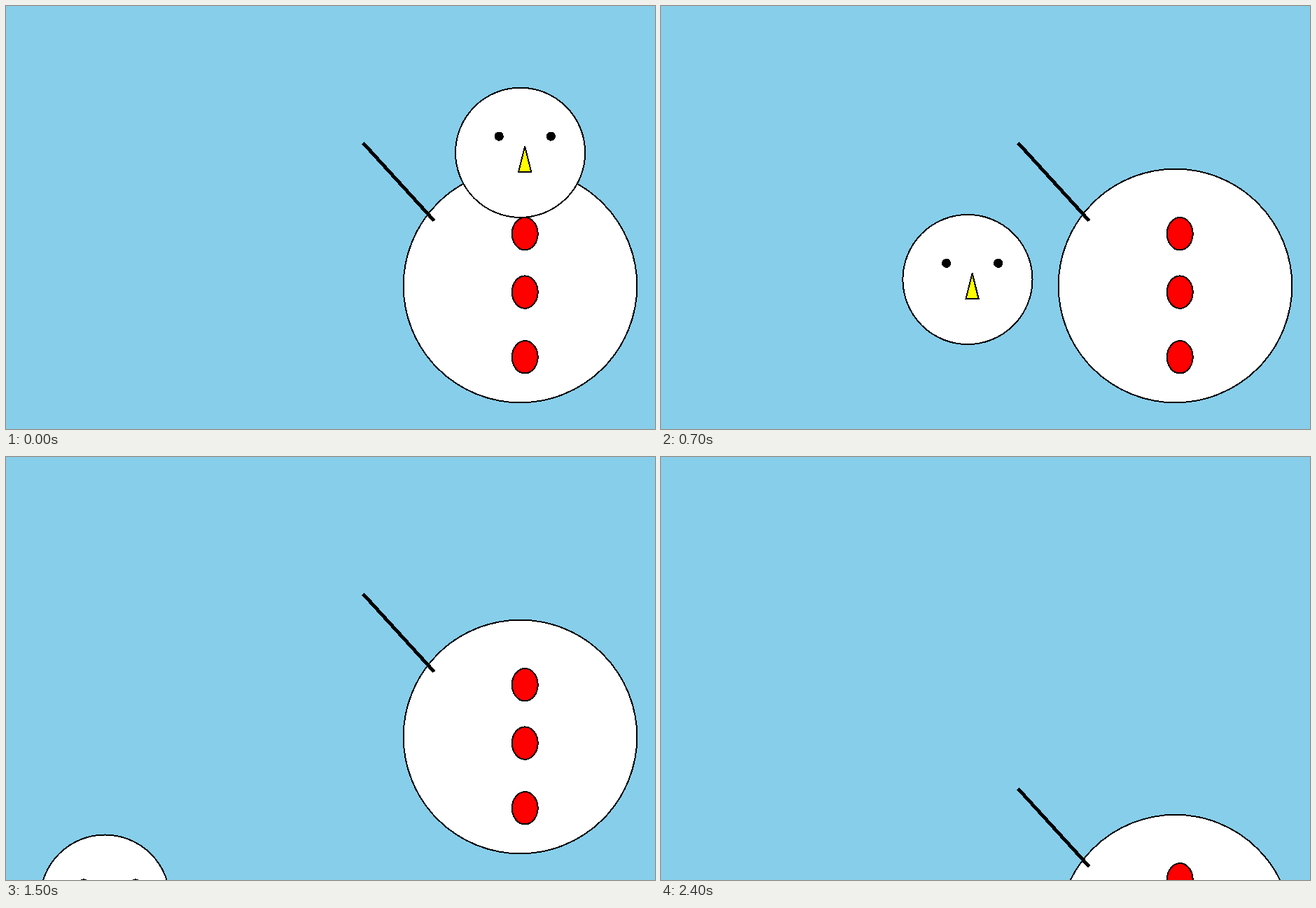
An HTML page that plays this animation: 927 px wide and 604 px high, repeating every 2600 ms.

```html
<!DOCTYPE html>
<html lang="en">
<head>
<meta charset="utf-8">
<title>Melting snowman</title>
<style>
html, body { margin: 0; width: 100%; height: 100%; overflow: hidden; background: #87ceeb; }
svg { display: block; width: 927px; height: 604px; }
</style>
</head>
<body>
<svg viewBox="0 0 927 604" shape-rendering="crispEdges" stroke="#000" stroke-width="2">
  <g id="torso">
    <circle cx="734.5" cy="399.5" r="166.8" fill="#fff"/>
    <path d="M509.9 195.4L611.5 306.6" stroke-width="5"/>
    <g fill="red">
      <ellipse cx="741.2" cy="325.2" rx="18.5" ry="23.2"/>
      <ellipse cx="741.2" cy="408.6" rx="18.5" ry="23.2"/>
      <ellipse cx="741.2" cy="501.3" rx="18.5" ry="23.2"/>
    </g>
  </g>
  <g id="head">
    <circle cx="734.6" cy="209.3" r="92.6" fill="#fff"/>
    <circle cx="704.2" cy="186.1" r="6.6" stroke="none"/>
    <circle cx="778.3" cy="186.1" r="6.6" stroke="none"/>
    <path d="M741.2 200.5L732 237.2H750.4Z" fill="#ff0"/>
  </g>
</svg>
<script>
const LOOP = 2600, TICK = 100;
const HEAD_LEFT = 74.16, HEAD_DOWN = 60.4, TORSO_DOWN = 55.62;
const head = document.getElementById('head');
const torso = document.getElementById('torso');

const clamp = (v, lo, hi) => Math.min(hi, Math.max(lo, v));
const move = (el, x, y) => el.setAttribute('transform', `translate(${x} ${y})`);

function draw() {
  const tick = Math.floor(performance.now() % LOOP / TICK);
  // The head tumbles down a staircase: odd steps go left, even steps go down.
  const step = clamp(tick, 0, 18);
  move(head, -HEAD_LEFT * Math.ceil(step / 2), HEAD_DOWN * Math.floor(step / 2));
  // After a short pause the torso sinks.
  move(torso, 0, TORSO_DOWN * clamp(tick - 19, 0, 5));
  requestAnimationFrame(draw);
}
draw();
</script>
</body>
</html>
```
